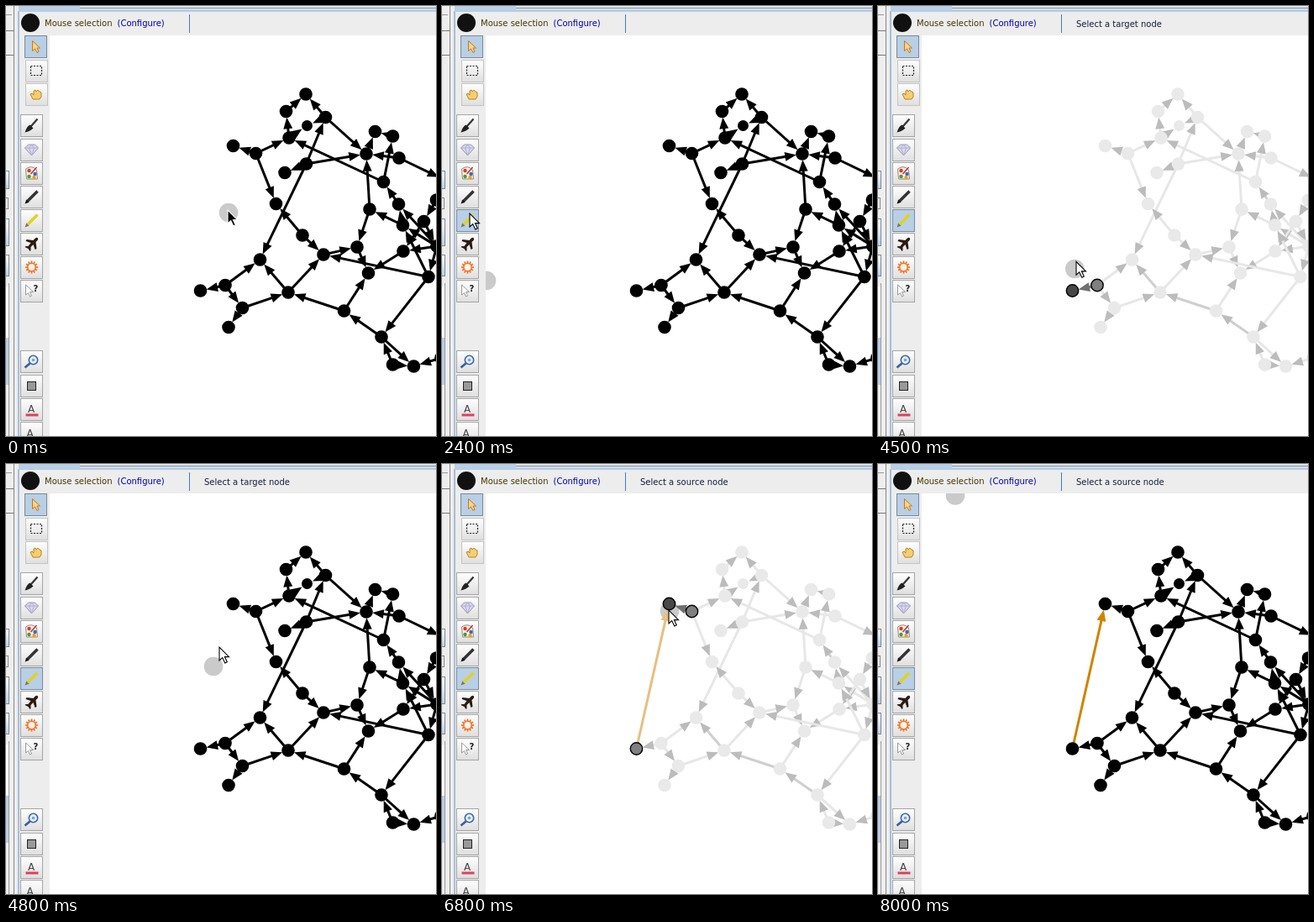
An HTML page with a canvas that plays this animation: 512x512 px, repeating every 8600 ms.

```html
<!DOCTYPE html>
<html lang="en">
<head>
<meta charset="utf-8">
<title>Connecting two nodes</title>
<style>
html, body { margin: 0; width: 100%; height: 100%; overflow: hidden; background: #ededed; }
canvas { display: block; }
</style>
</head>
<body>
<canvas id="stage" width="512" height="512"></canvas>
<script>
const g = document.getElementById('stage').getContext('2d');
const LOOP = 8600, STEP = 100, NODE_R = 7.8;
const FONT = '"DejaVu Sans", sans-serif';

const nodes = [
  [357, 105], [333.5, 125.5], [380.5, 132.5], [337, 157], [358.5, 142.5], [270.5, 166.5],
  [297.5, 175.5], [332, 198.5], [357.5, 188], [429, 176], [439.5, 149.5], [460.5, 155],
  [468, 181], [449.5, 209.5], [467.5, 236], [433, 242], [472.5, 261], [497.5, 256.5],
  [512.5, 231], [321.5, 235.5], [353, 273], [378, 296], [418, 287], [431.5, 318],
  [473, 292], [503, 322.5], [302.5, 302], [261, 332.5], [231.5, 339], [281.5, 359.5],
  [265, 382.5], [336, 341], [402.5, 363], [447, 394], [460.5, 427], [485.5, 429],
  [518, 419], [513, 286], [522, 207]
];
const edges = `1-0 2-0 3-1 3-4 2-4 6-5 6-3 6-19 8-7 8-9 8-2 8-26 2-9 13-3 9-10 11-10 13-11
  12-9 12-38 15-9 15-22 14-13 16-14 37-14 16-15 37-16 17-24 18-17 37-24 25-16 17-37 37-25
  20-19 20-21 21-22 22-23 24-23 25-21 25-33 32-23 32-31 31-26 31-21 27-26 27-28 27-29 29-30
  29-31 33-32 34-33 33-35 34-35 36-35`.split(/\s+/).map(e => e.split('-').map(Number));
const START = 28, END = 5;
const strong = ['33,32', '32,31', '31,26', '14,13'];

// keys: time, x, y
const pointerPath = [[200, 264, 243], [800, 86, 309], [900, 86, 309], [1100, 53, 325],
  [1200, 44, 313], [1800, 37, 259], [2000, 33, 247], [2700, 33, 247], [3400, 227, 332],
  [3700, 230, 333], [4400, 230, 333], [4800, 254, 218], [5300, 274, 172], [5400, 274, 172],
  [5700, 271, 170], [6700, 271, 170], [6800, 270, 174], [7200, 236, 214], [7400, 236, 214],
  [7900, 104, 8]];
const haloPath = [[200, 265, 246], [800, 85.5, 310], [900, 85.5, 310], [1100, 53, 327],
  [2800, 53, 327], [2801, 53, 255], [3400, 227, 334], [3700, 230, 337], [4400, 230, 337],
  [4800, 247, 241], [5300, 273, 174], [5700, 271.5, 173], [6700, 271.5, 173],
  [6800, 271, 175], [7200, 232, 222], [7400, 232, 222], [8000, 92, 37.5]];

function along(path, t) {
  const i = path.findIndex(k => k[0] >= t);
  if (i < 0) return path.at(-1).slice(1);
  if (!i) return path[0].slice(1);
  const [t0, x0, y0] = path[i - 1], [t1, x1, y1] = path[i], p = (t - t0) / (t1 - t0);
  return [x0 + (x1 - x0) * p, y0 + (y1 - y0) * p];
}

function rect(x, y, w, h, fill) {
  g.fillStyle = fill;
  g.fillRect(x, y, w, h);
}

function frame(x, y, w, h, color) {
  g.strokeStyle = color;
  g.lineWidth = 1;
  g.strokeRect(x + .5, y + .5, w - 1, h - 1);
}

function dot(x, y, r, fill, stroke, width = 1.3) {
  g.beginPath();
  g.arc(x, y, r, 0, 7);
  if (fill) { g.fillStyle = fill; g.fill(); }
  if (stroke) { g.strokeStyle = stroke; g.lineWidth = width; g.stroke(); }
}

function line(x1, y1, x2, y2, color, width = 1) {
  g.strokeStyle = color;
  g.lineWidth = width;
  g.beginPath();
  g.moveTo(x1, y1);
  g.lineTo(x2, y2);
  g.stroke();
}

function shape(d, x, y, fill, stroke, width = 1) {
  const p = new Path2D(d);
  g.save();
  g.translate(x, y);
  if (fill) { g.fillStyle = fill; g.fill(p); }
  if (stroke) { g.strokeStyle = stroke; g.lineWidth = width; g.stroke(p); }
  g.restore();
}

function text(s, x, y, color, size = 10) {
  g.fillStyle = color;
  g.font = size + 'px ' + FONT;
  g.fillText(s, x, y);
}

function verticalFade(y, h, top, bottom) {
  const f = g.createLinearGradient(0, y, 0, y + h);
  f.addColorStop(0, top);
  f.addColorStop(1, bottom);
  return f;
}

const ARROW = 'M0 0V16L3.7 12.6L6.8 19L9.3 17.8L6.4 11.6H11.5Z';

function pencil(x, y, color, tip) {
  line(x - 5, y + 5, x + 7, y - 7, color, 3.6);
  shape('M-8 8L-6.3 3L-3 6.3Z', x, y, tip);
}

// Each tool: centre x, centre y, icon
const tools = [
  [35.5, 48.5, (x, y) => shape('M-4 -7V5L-1 2.5L1.5 7L3.5 6L1.5 1.5H5Z', x, y, '#ffd28a', '#c47a1a')],
  [36, 77, (x, y) => {
    g.setLineDash([2, 1.5]);
    shape('M-6.5 -5.5H6.5V5.5H-6.5Z', x, y, null, '#222', 1.2);
    g.setLineDash([]);
  }],
  [36, 105, (x, y) => shape('M-4 6L-7 0L-5 -1L-3 1V-4L-1 -5L0 -3L2 -5L4 -3L6 -2V3L4 6Z', x, y, '#f6cf70', '#b98222')],
  [30.5, 142.5, (x, y) => {
    line(x - 1, y + 1, x + 7, y - 8, '#333', 2.2);
    shape('M-8 8Q-6 1 -2 -1L2 3Q-2 7 -8 8Z', x, y, '#222');
  }],
  [30.5, 171, (x, y) => {
    shape('M-8 -2L-4 -6H4L8 -2L0 7Z', x, y, '#d9d6ee', '#9a96bc');
    shape('M-8 -2H8M-3 -2L0 7L3 -2L0 -6Z', x, y, null, '#aaa6c8', .8);
  }],
  [30.5, 199, (x, y) => {
    shape('M-7 -5Q0 -10 6 -4L7 7H-6Z', x, y, '#f7f2e8', '#998877');
    [['#d33', -3, -3], ['#3a68c8', 4, 1], ['#4a9a3a', -3, 4], ['#e8a020', 3, 5]]
      .forEach(([c, dx, dy]) => dot(x + dx, y + dy, 2.2, c));
    line(x - 1, y + 1, x + 6, y - 7, '#b33', 1.5);
  }],
  [30.5, 227.5, (x, y) => pencil(x, y, '#333', '#111')],
  [30.5, 255.5, (x, y) => pencil(x, y, '#e3d21e', '#777')],
  [30.5, 283, (x, y) => shape('M7 -7Q5 -8 2 -4L-6 -5L-7 -3L-1 -1L-4 3H-7L-8 4L-4 6L-2 9L-1 8V4L2 1L4 7L6 6L5 -2Q9 -5 7 -7Z', x, y, '#2b1b10')],
  [30.5, 311, (x, y) => {
    for (let i = 0; i < 12; i++) {
      const a = i * Math.PI / 6, c = Math.cos(a), s = Math.sin(a);
      line(x + 5 * c, y + 5 * s, x + 7.5 * c, y + 7.5 * s, '#f07428', 1.8);
    }
    dot(x, y, 4.7, '#fff3ea', '#f07428', 1.6);
  }],
  [30.5, 339, (x, y) => {
    shape('M-7 -7V5L-4 2.5L-2 7L0 6L-2 1.5H2Z', x, y, '#fff', '#999');
    g.font = 'bold 10px ' + FONT;
    g.fillStyle = '#222';
    g.fillText('?', x + 2, y + 1);
  }],
  [30.5, 423.5, (x, y) => {
    line(x - 8, y + 7, x - 2, y + 2, '#345f9c', 2.6);
    dot(x + 2, y - 2, 5.2, '#e7f1ff', '#3b68a8', 1.6);
    dot(x + 2, y - 2, 1.8, '#7ba0d0');
  }],
  [30.5, 452, (x, y) => { rect(x - 5.5, y - 5, 11, 11, '#999'); frame(x - 5.5, y - 5, 11, 11, '#222'); }],
  [30.5, 480.5, (x, y) => { text('A', x - 4.5, y + 3, '#444', 12); rect(x - 7, y + 5, 15, 3, '#e0405c'); }],
  [30.5, 508.5, (x, y) => text('A', x - 6, y + 4, '#444', 12)]
];
const MARKER = 7;

function drawTool([x, y, icon], i, active, hover) {
  const left = Math.round(x - 13.5), top = Math.round(y - 13.5);
  rect(left, top, 27, 27, active ? '#b8cfe5' : verticalFade(top, 27, '#fff', hover ? '#cfe0f2' : '#dedede'));
  frame(left, top, 27, 27, active ? '#7a8a99' : hover ? '#7f9db9' : i < 3 ? '#c4c4c4' : '#a5a5a5');
  icon(x, y);
}

function drawWindow(t, px, py) {
  rect(0, 0, 512, 512, '#ededed');
  rect(0, 0, 10, 512, '#eee');
  rect(0, 29, 10, 1, '#777');
  rect(0, 58, 10, 1, '#777');
  rect(0, 10, 7, 1, '#999');
  rect(9, 0, 1, 512, '#888');
  rect(14, 6, 2, 506, '#a9bfd6');
  rect(15, 0, 73, 4, '#b8cfe5');
  rect(88, 0, 424, 2, '#dfe5ec');
  rect(88, 2, 424, 1, '#7a8a99');
  rect(15, 4, 497, 3, '#b8cfe5');
  [[196, 22], [253, 33], [296, 26]].forEach(([y, h]) => {
    rect(0, y, 4, h, verticalFade(y, h, '#fff', '#b8cfe5'));
    frame(-2, y, 6, h, '#7a8a99');
  });
  frame(-2, 228, 5, 14, '#888');
  rect(0, 334, 3, 61, '#fff');
  rect(0, 395, 3, 56, '#b8cfe5');
  rect(3, 330, 1, 182, '#999');
  rect(52, 35, 460, 477, '#fff');
  dot(29, 20, 11, '#111');
  text('Mouse selection', 46, 24, '#443600');
  text('(Configure)', 132.5, 24, '#0000b4');
  rect(218, 10, 1, 22, '#4a78b8');
  if (t >= 2800)
    text(`Select a ${t >= 4100 && t < 6100 ? 'target' : 'source'} node`, 236, 25, '#161c38');
  tools.forEach((tool, i) => drawTool(tool, i,
    i === 0 || i === MARKER && t >= 2400,
    t >= 1200 && t < 2400 && i > 2 && Math.abs(py - tool[1]) <= 14 && px < 45));
}

function drawEdge(a, b, color, headColor = color) {
  const [x1, y1] = nodes[a], [x2, y2] = nodes[b];
  const d = Math.hypot(x2 - x1, y2 - y1), ux = (x2 - x1) / d, uy = (y2 - y1) / d;
  const at = (r, side) => [x2 - ux * r - uy * side, y2 - uy * r + ux * side];
  const base = NODE_R + 13;
  if (d > base) line(x1, y1, ...at(base - 1, 0), color, 3);
  g.fillStyle = headColor;
  g.beginPath();
  g.moveTo(...at(NODE_R - .5, 0));
  g.lineTo(...at(base, 5.5));
  g.lineTo(...at(base, -5.5));
  g.fill();
}

function drawGraph(t) {
  const linked = t >= 6200;
  const focus = t >= 3400 && t < 4600 ? START : t >= 5200 && t < 7000 ? END : -1;
  const near = focus < 0 ? [] : focus === START ? [START, 27] : [END, 6];
  if (focus === END && linked) near.push(START);
  const lit = (a, b) => near.includes(a) && near.includes(b);

  for (const [a, b] of edges) {
    if (focus < 0) drawEdge(a, b, '#000');
    else if (lit(a, b)) drawEdge(a, b, '#808080', '#707070');
    else drawEdge(a, b, strong.includes(a + ',' + b) ? '#cfcfcf' : '#e7e7e7', '#bcbcbc');
  }
  if (linked) drawEdge(START, END, focus < 0 ? '#d08400' : '#e6c07f');
  nodes.forEach(([x, y], i) => {
    const r = i === 4 ? 6.5 : NODE_R;
    if (focus < 0) dot(x, y, r, '#000');
    else if (near.includes(i)) dot(x, y, 7.2, i === focus ? '#484848' : '#808080', '#000', 1.4);
    else dot(x, y, r, '#e9e9e9');
  });
}

function draw(now) {
  const t = Math.floor(now % LOOP / STEP) * STEP;
  const [px, py] = along(pointerPath, t);
  drawWindow(t, px, py);
  g.save();
  g.beginPath();
  g.rect(52, 35, 460, 477);
  g.clip();
  dot(...along(haloPath, t), 11.3, '#cacaca');
  drawGraph(t);
  g.restore();
  if (t < 8000) {
    const dark = t < 1300;
    shape(ARROW, px, py, dark ? '#000' : '#fff', dark ? '#fff' : '#000', 1.1);
  }
  requestAnimationFrame(tick);
}

const begin = performance.now();
function tick() { draw(performance.now() - begin); }
tick();
</script>
</body>
</html>
```
